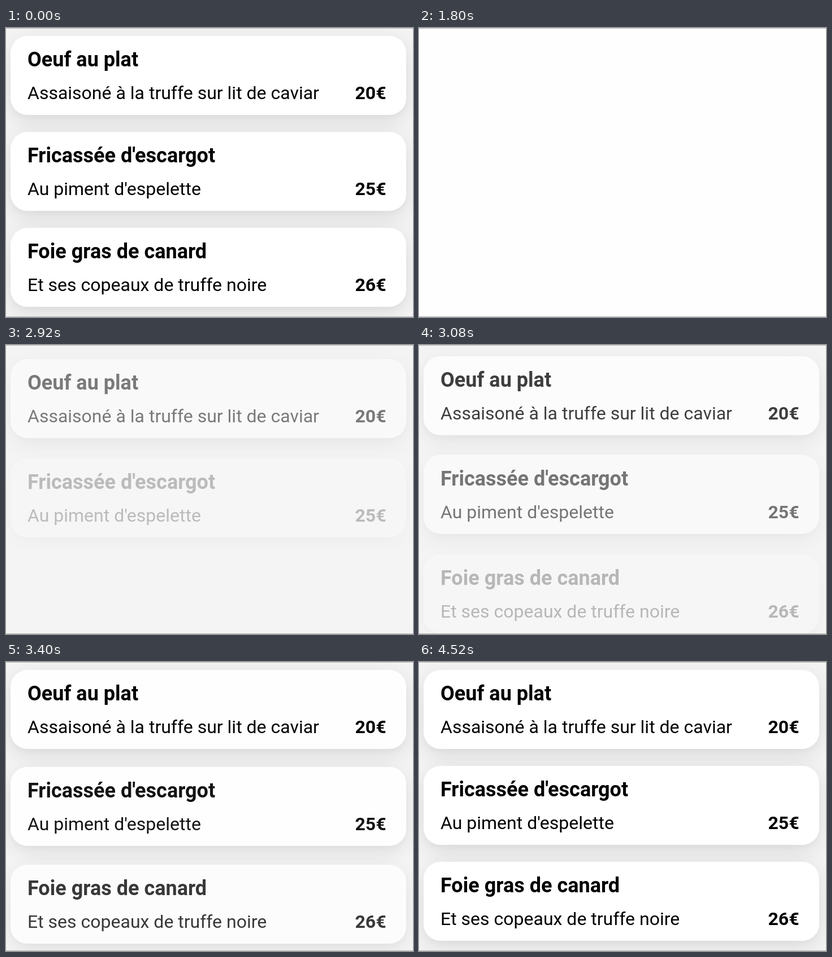
Recreate the animation shown at these times as an HTML page. Size 720 by 512 pixels, loop 5.08 s.

```html
<!DOCTYPE html>
<html lang="fr">
<head>
<meta charset="utf-8">
<title>Menu</title>
<style>
  html, body { margin: 0; width: 100%; height: 100%; overflow: hidden; background: #fefefe; }
  svg { display: block; width: 720px; height: 512px; }
  text { font: 32px Roboto, sans-serif; }
  .bold { font-weight: 700; }
  .title { font-size: 36px; }
</style>
</head>
<body>
<svg id="stage" viewBox="0 0 720 512">
  <defs>
    <filter id="wide" filterUnits="userSpaceOnUse" x="-80" y="-80" width="880" height="320">
      <feGaussianBlur stdDeviation="20"/>
    </filter>
    <filter id="tight" filterUnits="userSpaceOnUse" x="-80" y="-80" width="880" height="320">
      <feGaussianBlur stdDeviation="4"/>
    </filter>
  </defs>
  <rect width="720" height="512" fill="#fefefe"/>
  <g id="page"><rect width="720" height="512" fill="#f4f4f4"/></g>
  <path d="M0 .5H720M0 511.5H720" stroke="#b0b0b0"/>
</svg>
<script>
const LOOP = 5080;
const FADE_START = 1570, FADE_END = 1800;
const SHOW = 2720;
const ENTER = 2655, STAGGER = 150, DURATION = 800, RISE = 22;

const dishes = [
  ["Oeuf au plat", "Assaisoné à la truffe sur lit de caviar", "20€"],
  ["Fricassée d'escargot", "Au piment d'espelette", "25€"],
  ["Foie gras de canard", "Et ses copeaux de truffe noire", "26€"]
];

const page = document.getElementById("page");

function add(parent, tag, attrs, text) {
  const el = document.createElementNS("http://www.w3.org/2000/svg", tag);
  for (const key in attrs) el.setAttribute(key, attrs[key]);
  if (text) el.textContent = text;
  parent.appendChild(el);
  return el;
}

function addCard([title, detail, price]) {
  const card = add(page, "g", {});
  const box = (y, more) =>
    add(card, "rect", { x: 8, y, width: 700, height: 140, rx: 30, ...more });
  box(10, { filter: "url(#wide)", opacity: 0.1 });
  box(6, { filter: "url(#tight)", opacity: 0.02 });
  box(0, { fill: "#fff" });
  add(card, "text", { x: 38, y: 54, class: "bold title" }, title);
  add(card, "text", { x: 38, y: 112 }, detail);
  add(card, "text", { x: 617.5, y: 112, class: "bold" }, price);
  return card;
}

const cards = dishes.map(addCard);
const clamp = v => Math.min(1, Math.max(0, v));
const easeOut = v => Math.sin(clamp(v) * Math.PI / 2);

function render(t) {
  const entering = t >= SHOW;
  const fade = clamp((t - FADE_START) / (FADE_END - FADE_START));
  page.setAttribute("opacity", entering ? 1 : 1 - fade);
  cards.forEach((card, i) => {
    const p = entering ? easeOut((t - ENTER - i * STAGGER) / DURATION) : 1;
    card.setAttribute("opacity", p);
    card.setAttribute("transform", `translate(0 ${14 + i * 170 + RISE * (1 - p)})`);
  });
}

const start = performance.now();
function tick() {
  render((performance.now() - start) % LOOP);
  requestAnimationFrame(tick);
}
render(0);
requestAnimationFrame(tick);
</script>
</body>
</html>
```
